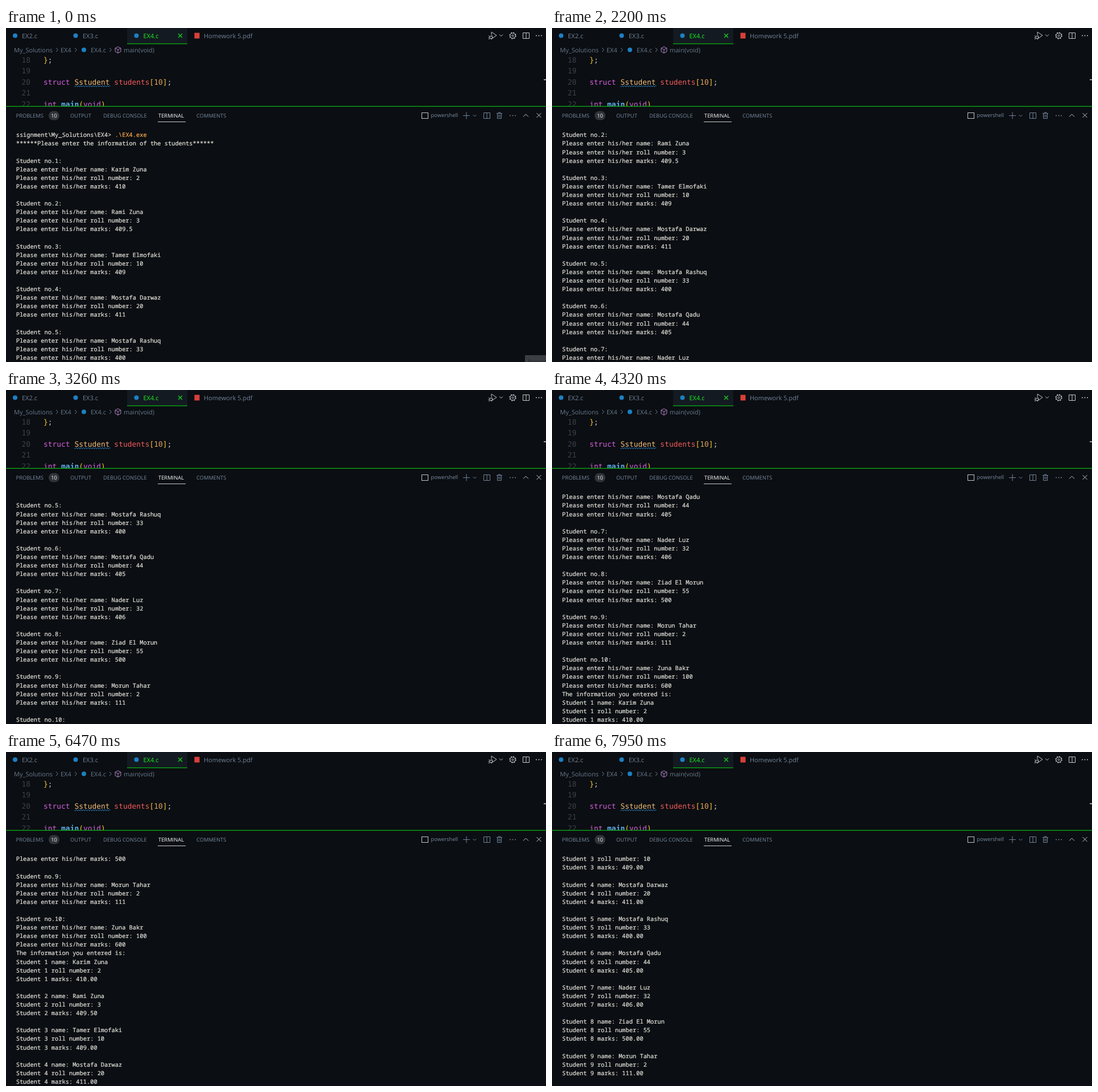
An HTML page that plays this animation: 950x589 px, repeating every 8 s.

```html
<!DOCTYPE html>
<html lang="en">
<head>
<meta charset="utf-8">
<title>Terminal scroll</title>
<style>
  html, body { margin: 0; width: 100%; height: 100%; overflow: hidden; background: #0b0e12; }
  svg { display: block; text-rendering: geometricPrecision; }
  .ui { font: 11px "Open Sans", "Noto Sans", sans-serif; fill: #71839a; }
  .crumb { fill: #66788c; }
  .panel { font: 9.35px "Open Sans", "Noto Sans", sans-serif; fill: #788aa1; }
  .code { font: 12.92px "DejaVu Sans Mono", monospace; fill: #c3c9d4; white-space: pre; }
  .num { fill: #3b424d; }
  .key { fill: #d55fde; }
  .type { fill: #f2bd77; }
  .var { fill: #f25c5c; }
  .bracket { fill: #f5c530; }
  .lit { fill: #dda45f; }
  .func { fill: #61afef; font-weight: bold; }
  .term { font: 10.37px "Noto Sans Mono", monospace; fill: #e2e1d9; stroke: #e2e1d9; stroke-width: .22; white-space: pre; }
  .cmd { fill: #f7a84c; stroke: #f7a84c; }
  .lang { fill: #1c80c4; }
  .icon { fill: none; stroke: #c3c9d1; stroke-width: 1; }
  .dim { stroke: #71839a; }
  .dots { fill: #c3c9d1; stroke: none; }
</style>
</head>
<body>
<svg width="950" height="589" viewBox="0 0 950 589">
  <rect width="950" height="589" fill="#0b0e12"/>

  <!-- tabs -->
  <rect x="213" width="106" height="28" fill="#131a21"/>
  <rect x="213" y="27" width="106" height="1.5" fill="#0a9a14"/>
  <g class="lang">
    <circle cx="16" cy="13.5" r="4"/>
    <circle cx="122.5" cy="13.5" r="4"/>
    <circle cx="229.5" cy="13.5" r="4"/>
    <circle cx="137" cy="38.5" r="4"/>
  </g>
  <g class="ui">
    <text x="28" y="17.5">EX2.c</text>
    <text x="135" y="17.5">EX3.c</text>
    <text x="241.5" y="17.5" fill="#17f01f">EX4.c</text>
    <text x="348" y="17.5">Homework 5.pdf</text>
  </g>
  <path class="icon" style="stroke:#17d51f;stroke-width:1.2" d="M303 10l7 7m0-7l-7 7"/>
  <rect x="331.5" y="8.5" width="9" height="10" fill="#d8403a"/>

  <!-- breadcrumbs -->
  <g class="ui">
    <text class="crumb" x="14" y="42.5">My_Solutions</text>
    <text class="crumb" x="96" y="42.5">EX4</text>
    <text class="crumb" x="149" y="42.5">EX4.c</text>
    <text class="crumb" x="207" y="42.5">main(void)</text>
  </g>
  <path class="icon dim" d="M88 35l3.5 3.5l-3.5 3.5M121 35l3.5 3.5l-3.5 3.5M182 35l3.5 3.5l-3.5 3.5"/>
  <path class="icon" style="stroke:#b184c6" d="M197 33l5 2.5v6l-5 2.8l-5-2.8v-6zM192 35.5l5 2.7l5-2.7M197 38.2v6"/>

  <!-- editor actions -->
  <g class="icon">
    <path d="M854 12.5V7l9 6l-7 5"/>
    <circle cx="853.5" cy="16.5" r="2.5"/>
    <path d="M849 13.5l2 1.5m-2.5 2h2m-1.5 3l2-1.5m5-5l-2 1.5m.5 2h2m-1.5 3l-2-1.5M868 11.5l3 3l3-3"/>
    <circle cx="891.5" cy="13.5" r="4.6"/>
    <circle cx="891.5" cy="13.5" r="1.6"/>
    <circle cx="891.5" cy="13.5" r="5.4" stroke-width="1.5" stroke-dasharray="2.1 2.14"/>
    <path d="M909.5 8.5h11v10h-11zM915 8.5v10"/>
  </g>
  <g class="dots">
    <circle cx="933" cy="13.5" r="1"/><circle cx="937.5" cy="13.5" r="1"/><circle cx="942" cy="13.5" r="1"/>
  </g>

  <!-- code -->
  <clipPath id="editor"><rect y="46" width="950" height="92"/></clipPath>
  <g class="code" clip-path="url(#editor)">
    <g class="num">
      <text x="27.5" y="60.5">18</text><text x="27.5" y="80">19</text>
      <text x="27.5" y="99.7">20</text><text x="27.5" y="119.2">21</text>
      <text x="27.5" y="138.7">22</text>
    </g>
    <text x="66" y="60.5"><tspan class="bracket">}</tspan>;</text>
    <text x="66" y="99.7"><tspan class="key">struct</tspan> <tspan class="type">Sstudent</tspan> <tspan class="var">students</tspan><tspan class="bracket">[</tspan><tspan class="lit">10</tspan><tspan class="bracket">]</tspan>;</text>
    <text x="66" y="138.7"><tspan class="key">int</tspan> <tspan class="func">main</tspan><tspan class="bracket">(</tspan><tspan class="key">void</tspan><tspan class="bracket">)</tspan></text>
  </g>
  <path id="squiggle" fill="none" stroke="#2f8fd8"/>
  <rect x="946" y="90.5" width="4" height="1.5" fill="#d0d4d8"/>
  <rect y="137.5" width="950" height="1.5" fill="#0a9a14"/>

  <!-- panel header -->
  <g class="panel">
    <text x="17.5" y="158">PROBLEMS</text>
    <text x="113" y="158">OUTPUT</text>
    <text x="171" y="158">DEBUG CONSOLE</text>
    <text x="268" y="158" fill="#fff">TERMINAL</text>
    <text x="335" y="158">COMMENTS</text>
    <rect x="75" y="146.5" width="19" height="16" rx="8" fill="#30353b"/>
    <text x="84.5" y="158" text-anchor="middle" fill="#f0f2f4">10</text>
    <text x="747.5" y="157.3">powershell</text>
  </g>
  <rect x="267" y="165" width="49" height="1" fill="#c9ccd0"/>
  <g class="icon">
    <rect x="731.5" y="149.5" width="11" height="10"/>
    <path class="dim" d="M804 154.5h12M810 148.5v12M821.5 153l3 3l3-3M840.5 149.5h11v10h-11zM846 149.5v10"/>
    <path class="dim" d="M863 150.5h10M866.5 150.5v-1.5h3v1.5M864.5 150.5v9h7v-9M866.8 152.5v5M869.2 152.5v5"/>
    <path d="M910 156.5l4.5-4.5l4.5 4.5M933.5 150l8 8m0-8l-8 8"/>
  </g>
  <g class="dots" style="fill:#71839a">
    <circle cx="887" cy="154.5" r="1"/><circle cx="891.5" cy="154.5" r="1"/><circle cx="896" cy="154.5" r="1"/>
  </g>

  <g id="rows" class="term"></g>
  <g id="tip">
    <rect x="913" y="577" width="37" height="12" fill="#3b3e43"/>
    <text x="918" y="592" style="font:10px 'Open Sans',sans-serif" fill="#202429">Record</text>
  </g>
</svg>
<script>
const LOOP = 8000, ROWS = 27, PITCH = 15.1;
const $ = id => document.getElementById(id);

// name, roll number, marks
const students = [
  ["Karim Zuna", 2, 410], ["Rami Zuna", 3, 409.5], ["Tamer Elmofaki", 10, 409],
  ["Mostafa Darwaz", 20, 411], ["Mostafa Rashuq", 33, 400], ["Mostafa Qadu", 44, 405],
  ["Nader Luz", 32, 406], ["Ziad El Morun", 55, 500], ["Morun Tahar", 2, 111],
  ["Zuna Bakr", 100, 600]
];

const ask = "Please enter his/her ";
const lines = [
  'ssignment\\My_Solutions\\EX4&gt; <tspan class="cmd">.\\EX4.exe</tspan>',
  "******Please enter the information of the students******"
];
students.forEach(([name, roll, marks], i) => lines.push(
  "", `Student no.${i + 1}:`, `${ask}name: ${name}`,
  `${ask}roll number: ${roll}`, `${ask}marks: ${marks}`));
lines.push("The information you entered is:");
students.forEach(([name, roll, marks], i) => {
  const who = `Student ${i + 1} `;
  lines.push(`${who}name: ${name}`, `${who}roll number: ${roll}`,
    `${who}marks: ${marks.toFixed(2)}`, "");
});

// Wheel gestures: first step, last step, top line after each step
const gestures = [
  [1520, 1860, [1, 2, 3, 4, 5]],
  [2060, 2340, [6, 7, 8, 9, 10]],
  [2600, 2940, [11, 13, 14, 15, 16]],
  [3120, 3260, [18, 20, 22]],
  [3790, 3930, [24, 26, 27]],
  [4320, 4460, [29, 31, 32]],
  [5060, 5330, [34, 35, 36, 37, 38]],
  [6260, 6470, [38, 39, 40, 41]],
  [6800, 7150, [42, 44, 46, 47, 48, 49]],
  [7350, 7480, [52, 55]],
  [7810, 7950, [58, 60, 62]]
];
const steps = gestures.flatMap(([from, to, tops]) =>
  tops.map((top, i) => [from + (to - from) * i / (tops.length - 1), top]));

const rows = Array.from({ length: ROWS }, (_, i) => {
  const row = document.createElementNS("http://www.w3.org/2000/svg", "text");
  row.setAttribute("x", 17.7);
  row.setAttribute("y", Math.round(192.3 + i * PITCH));
  return $("rows").appendChild(row);
});

let wave = "M120.5 102.7";
for (let i = 0; i < 30; i++) wave += `q1.05 ${i % 2 ? -2.4 : 2.4} 2.1 0`;
$("squiggle").setAttribute("d", wave);

let shown = -1;
function draw() {
  const t = performance.now() % LOOP;
  let top = 0;
  for (const [at, line] of steps) if (t >= at - 0.5) top = line;
  if (top !== shown) {
    rows.forEach((row, i) => row.innerHTML = lines[top + i] || "");
    shown = top;
  }
  $("tip").style.display = t < 70 ? "" : "none";
  requestAnimationFrame(draw);
}
draw();
</script>
</body>
</html>
```
